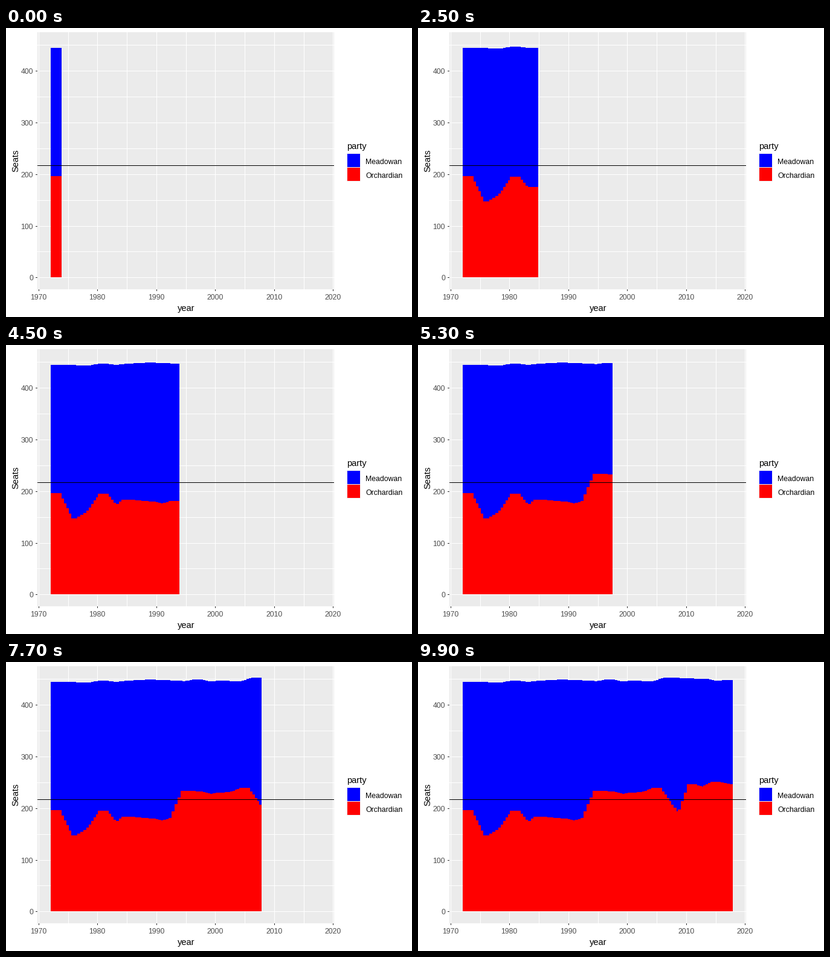
A matplotlib script that plays this animation: 672x480 px, repeating every 10 s.

```python
import numpy as np
import matplotlib.pyplot as plt
from matplotlib.animation import FuncAnimation
from matplotlib.collections import PolyCollection
from matplotlib.patches import Rectangle

W, H, DPI = 672, 480, 96
FRAMES, INTERVAL = 100, 100
BLUE, RED = "#0000FF", "#FF0000"
LEFT, TOP, RIGHT, BOTTOM = 52, 7, 543, 434
HALF_BAR = 0.9

plt.rcParams["font.family"] = "Liberation Sans"

years = np.arange(1973, 2018, 2)
red_seats = [196, 147, 147, 162, 195, 167, 184, 181, 180, 174, 181, 234,
             232, 226, 230, 231, 239, 207, 182, 246, 239, 251, 246]
all_seats = [445, 445, 443, 443, 447, 444, 446, 448, 449, 448, 447, 445,
             449, 444, 447, 445, 446, 453, 452, 451, 451, 445, 448]

# Each two-year step lasts 4.5 frames, rounded half to even
key_frames = [round(1 + 4.5 * k) - 1 for k in range(len(years))]


def px(year):
    return round(54.0 + 9.746 * (year - 1970))


def py(seats):
    return round(414.35 - 0.8575 * seats)


def tween(values):
    return np.interp(np.arange(FRAMES), key_frames, values)


def bars(seats):
    """One bar from zero for every moment; they pile up over time."""
    base = py(0)
    verts = []
    for year, value in zip(tween(years), tween(seats)):
        x0, x1, y = px(year - HALF_BAR), px(year + HALF_BAR), py(value)
        verts.append([(x0, base), (x0, y), (x1, y), (x1, base)])
    return verts


fig = plt.figure(figsize=(W / DPI, H / DPI), dpi=DPI, facecolor="white")
ax = fig.add_axes([0, 0, 1, 1])
ax.set_xlim(0, W)
ax.set_ylim(H, 0)
ax.axis("off")


def box(x0, y0, x1, y1, color, z=1):
    ax.add_patch(Rectangle((x0, y0), x1 - x0, y1 - y0, facecolor=color,
                           linewidth=0, antialiased=False, zorder=z))


def label(x, y, text, size=9.2, color="black", **kw):
    ax.text(x, y, text, fontsize=size, color=color,
            va="baseline", rotation_mode="anchor", **kw)


# Panel, grid and axes
box(LEFT, TOP, RIGHT, BOTTOM, "#EBEBEB", 0)
for year in range(1970, 2021, 5):
    x = px(year)
    box(x, TOP, x + 1, BOTTOM, "white")
    if year % 10 == 0:
        box(x, BOTTOM, x + 1, BOTTOM + 3, "#333333")
        label(x, 451, str(year), color="#4D4D4D", ha="center")
for seats in range(0, 451, 50):
    y = py(seats)
    box(LEFT, y, RIGHT, y + 1, "white")
    if seats % 100 == 0:
        box(LEFT - 3, y, LEFT, y + 1, "#333333")
        label(45, y + 5, str(seats), color="#4D4D4D", ha="right")
label(298, 470, "year", 11, ha="center")
label(20, 220, "Seats", 11, ha="center", rotation=90)

# Legend
label(564, 201, "party", 11)
box(564, 208, 587, 255, "#F2F2F2")
for y, color, name in ((209, BLUE, "Meadowan"), (232, RED, "Orchardian")):
    box(565, y, 586, y + 22, color, 2)
    label(595, y + 17, name)

# Growing bars with the majority line on top
layers = []
for seats, color, z in ((all_seats, BLUE, 2), (red_seats, RED, 3)):
    coll = PolyCollection([], facecolors=color, linewidths=0,
                          antialiaseds=False, zorder=z)
    coll.set_snap(False)
    ax.add_collection(coll, autolim=False)
    layers.append((coll, bars(seats)))
box(LEFT, py(217.5), RIGHT, py(217.5) + 1, "black", 4)


def update(frame):
    for coll, verts in layers:
        coll.set_verts(verts[:frame + 1])
    return [coll for coll, _ in layers]


anim = FuncAnimation(fig, update, frames=FRAMES, interval=INTERVAL,
                     repeat=True, repeat_delay=0)
plt.show()
```
